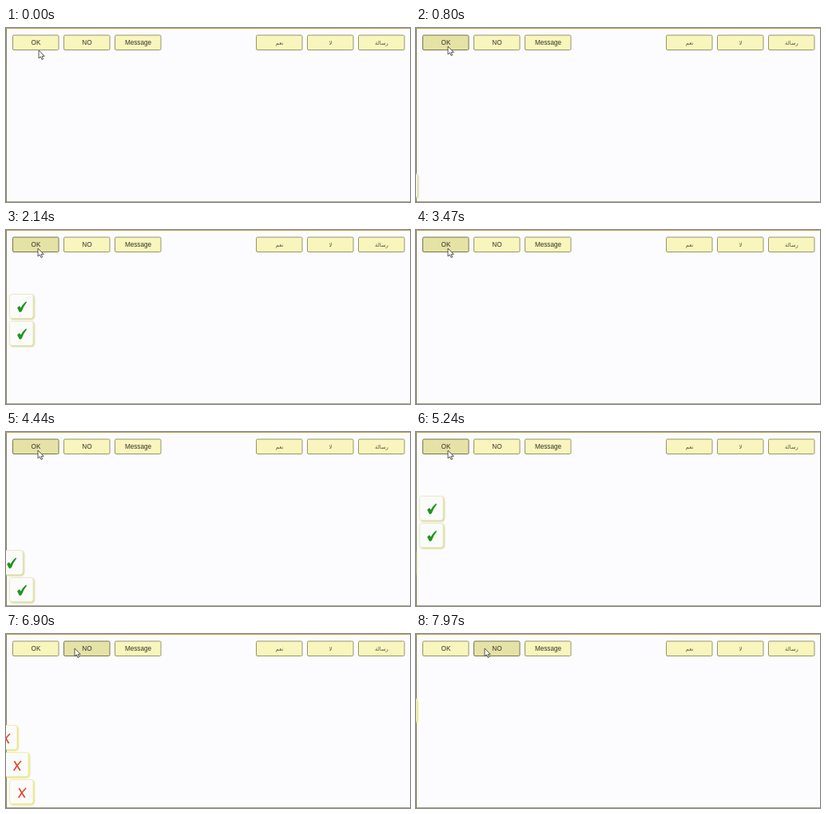
An HTML page that plays this animation: 506x218 px, repeating every 8000 ms.

```html
<!DOCTYPE html>
<html lang="en">
<head>
<meta charset="utf-8">
<style>
  html, body { margin: 0; width: 100%; height: 100%; overflow: hidden; background: #fcfcfe; }
  svg { display: block; width: 506px; height: 218px; }
  text { font: 8.2px "Liberation Sans", Arial, sans-serif; text-anchor: middle; fill: #33332a; }
  text.arabic { font: 6.8px "DejaVu Sans", sans-serif; fill: #55554a; }
  .button rect { fill: #f8f6bd; stroke: #96946a; }
  .button.hover rect { fill: #e5e2a5; stroke: #77754c; }
  .button.pressed rect { fill: #f8f5c4; stroke: #c9c697; }
  .toast rect { fill: #fbfbfa; stroke: #eceacb; filter: drop-shadow(1px 1px 1px #c9ca72); }
  .toast.no rect { stroke: #f0eeb0; filter: drop-shadow(1px 1px 1px #dcda55); }
</style>
</head>
<body>
<svg id="stage" viewBox="0 0 506 218">
  <rect width="506" height="218" fill="#fcfcfe"/>
  <path d="M0 217.5H506" stroke="#a9a78a"/>
  <path d="M.5 0V218" stroke="#85835a"/>
  <path d="M0 .5H506" stroke="#bda64e"/>
  <g id="buttons"></g>
  <g id="toasts"></g>
  <path id="cursor" d="M0 0V10L2.4 7.9L4 11.5L5.7 10.8L4.1 7.3H7.2Z" fill="#fff" stroke="#45453c" stroke-width=".9"/>
</svg>
<script>
const LOOP = 8000;
const ENTER = 500, LEAVE = 700, LIFE = 1060;
const TRAVEL = 36, SLOT_PITCH = 34, PRESS_TIME = 110;

const labels = [[8, "OK"], [72, "NO"], [136, "Message"], [313, "نعم"], [377, "لا"], [441, "رسالة"]];
const marks = {
  ok: '<path d="M14.4 199.4L16.8 197.4L18.5 200Q21 195 25 191.8L25.7 192.4Q21.6 197.5 19.3 204L17 204.7Z" fill="#179a18" stroke="#0c7410" stroke-width=".5"/>',
  no: '<path d="M16.3 193.2Q19.5 198.5 23.7 205M25 193Q19 199 15.7 205.2" fill="none" stroke="#e5482c" stroke-width="1.7"/>'
};

// Each group stacks upwards from the bottom slot.
const groups = [
  { kind: "ok", starts: [780, 1064, 1450, 1640] },
  { kind: "ok", starts: [3930, 4267, 4570, 4740] },
  { kind: "no", starts: [6420, 6637, 6793, 7036] }
];
const presses = [670, 950, 1240, 1540, 3820, 4150, 4460, 4630, 6310, 6530, 6690, 6930];

const cursorKeys = [[0, 41, 28], [100, 41, 28], [400, 40, 23], [5300, 40, 23], [5750, 86, 18], [LOOP, 86, 18]];

const byId = id => document.getElementById(id);

function addGroup(parent, className, markup) {
  const g = document.createElementNS("http://www.w3.org/2000/svg", "g");
  g.setAttribute("class", className);
  g.innerHTML = markup;
  byId(parent).append(g);
  return g;
}

const buttons = labels.map(([x, label], i) => ({
  x,
  node: addGroup("buttons", "button",
    `<rect x="${x + .5}" y="9" width="57.5" height="18.5" rx="1.5"/>
     <text x="${x + 29.5}" y="${i < 3 ? 21.3 : 20.5}" class="${i < 3 ? "" : "arabic"}">${label}</text>`)
}));

const toasts = groups.flatMap(({ kind, starts }) => starts.map((start, slot) => ({
  start, slot,
  node: addGroup("toasts", "toast " + kind,
    `<rect x="4.5" y="182.5" width="29.5" height="30" rx="3"/>${marks[kind]}`)
})));

const clamp = t => Math.min(1, Math.max(0, t));
const ease = t => 1 - (1 - clamp(t)) ** 2.4;

function cursorAt(t) {
  const i = cursorKeys.findIndex(key => key[0] > t);
  const [t0, x0, y0] = cursorKeys[i - 1], [t1, x1, y1] = cursorKeys[i];
  const u = (t - t0) / (t1 - t0), s = u * u * (3 - 2 * u);
  return [x0 + (x1 - x0) * s, y0 + (y1 - y0) * s];
}

function draw(t) {
  const [cx, cy] = cursorAt(t);
  byId("cursor").setAttribute("transform", `translate(${cx} ${cy})`);

  const pressed = presses.some(p => t >= p && t < p + PRESS_TIME);
  for (const { x, node } of buttons) {
    const over = cx >= x && cx <= x + 58 && cy >= 9 && cy <= 27.5;
    node.setAttribute("class", "button" + (over ? (pressed ? " pressed" : " hover") : ""));
  }

  for (const { start, slot, node } of toasts) {
    const age = t - start;
    const shown = ease(age / ENTER) - ease((age - LEAVE) / (LIFE - LEAVE));
    node.style.display = age > 0 && age < LIFE ? "" : "none";
    node.setAttribute("transform", `translate(${(shown - 1) * TRAVEL} ${-slot * SLOT_PITCH})`);
  }
}

const origin = performance.now();
function frame() {
  draw((performance.now() - origin) % LOOP);
  requestAnimationFrame(frame);
}
frame();
</script>
</body>
</html>
```
